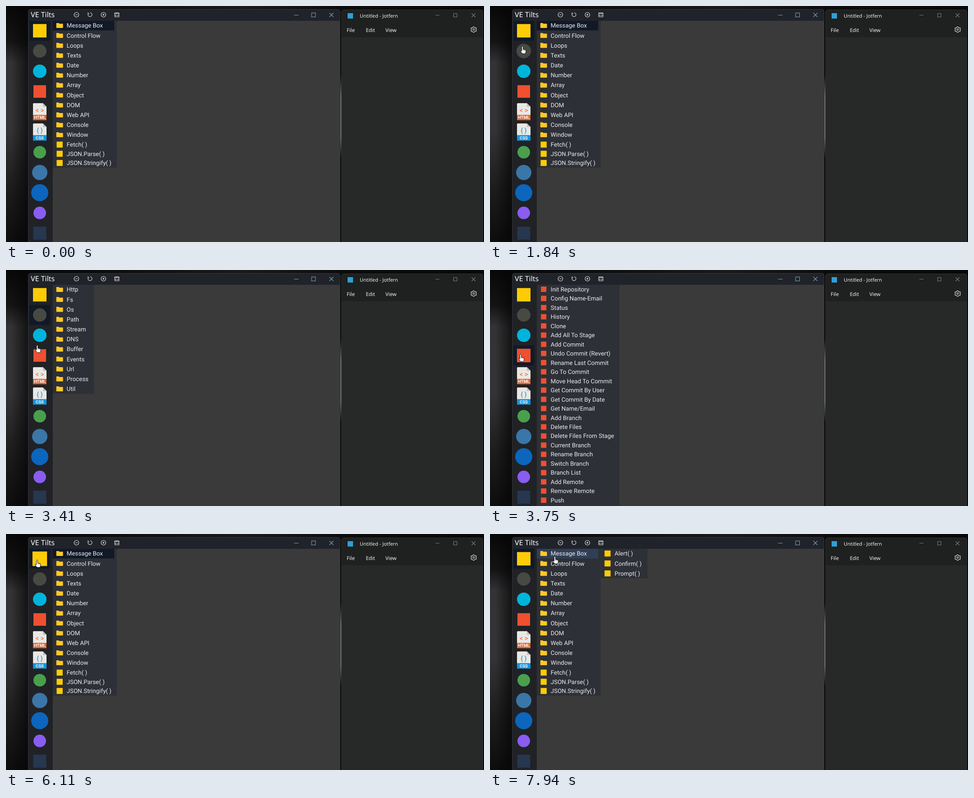
Write an HTML page that moves like this. It is 1062x527 px and loops after 8 s.

```html
<!DOCTYPE html>
<html lang="en">
<head>
<meta charset="utf-8">
<style>
html, body { margin: 0; width: 100%; height: 100%; overflow: hidden; background: #050506; }
svg { display: block; width: 1062px; height: 527px; }
text { fill: #ececee; font: 13.4px Roboto, sans-serif; white-space: pre; text-rendering: geometricPrecision; }
.ui { font-family: "Open Sans", sans-serif; fill: #fff; }
.bar { font-size: 11.4px; }
.line { fill: none; stroke: #e8e8e8; stroke-width: 1.1; }
</style>
</head>
<body>
<svg viewBox="0 0 1062 527">
  <defs>
    <linearGradient id="wall" x2="0" y2="1">
      <stop offset="0" stop-color="#080808"/><stop offset=".15" stop-color="#141415"/>
      <stop offset=".24" stop-color="#333335"/><stop offset=".52" stop-color="#343436"/>
      <stop offset=".75" stop-color="#1e1e1f"/><stop offset="1" stop-color="#0d0d0e"/>
    </linearGradient>
    <linearGradient id="shade">
      <stop offset=".25" stop-color="#050506" stop-opacity="0"/><stop offset="1" stop-color="#050506" stop-opacity=".7"/>
    </linearGradient>
    <linearGradient id="top">
      <stop offset=".05" stop-color="#070708"/><stop offset=".5" stop-color="#1a1a1c"/>
      <stop offset=".7" stop-color="#0d0d0e"/><stop offset="1" stop-color="#080808"/>
    </linearGradient>
    <linearGradient id="glint" x2="0" y2="1">
      <stop offset="0" stop-color="#777" stop-opacity="0"/><stop offset=".25" stop-color="#757575"/>
      <stop offset=".75" stop-color="#757575"/><stop offset="1" stop-color="#777" stop-opacity="0"/>
    </linearGradient>
    <path id="folder" d="M-7.4-4.6q0-1 1-1h4.2l1.6 1.5H6.4q1 0 1 1V4.5q0 1-1 1H-6.4q-1 0-1-1z" fill="#ffc928"/>
    <rect id="script" x="-6.7" y="-6.7" width="13.4" height="13.4" fill="#fdcc07"/>
    <rect id="branch" x="-6" y="-6" width="12" height="12" fill="#ee5030"/>
  </defs>

  <!-- desktop -->
  <rect width="1062" height="527" fill="#050506"/>
  <rect width="1062" height="8" fill="url(#top)"/>
  <rect width="49" height="527" fill="url(#wall)"/>
  <rect width="49" height="527" fill="url(#shade)"/>
  <rect x="742" y="155" width="3" height="185" fill="url(#glint)"/>

  <!-- tool window -->
  <path d="M49 527V13q0-6 6-6H737q6 0 6 6V527z" fill="#202329"/>
  <rect x="49" y="33" width="55" height="494" fill="#202226"/>
  <path d="M49.5 527V13q0-5.5 5.5-5.5H737q5.5 0 5.5 5.5V33" fill="none" stroke="#33363c"/>
  <rect x="104" y="33" width="638.5" height="494" fill="#3a3a3a"/>
  <text x="55" y="25" class="ui" style="font-size:16px;font-family:'Noto Sans',sans-serif">VE Tilts</text>
  <g class="line">
    <circle cx="156.5" cy="19.5" r="5.2"/><path d="M154 19.5h5"/>
    <path d="M183 16.5a4.5 4.5 0 1 0 4-1.7M182.3 14.3v3h3"/>
    <circle cx="216.5" cy="19.5" r="5.2"/><path d="M214 19.5h5M216.5 17v5"/>
    <rect x="241.5" y="15.2" width="9.6" height="9" rx="1"/>
    <path d="M241.5 16.5h9.6M245 19l-1.5 1.7 1.5 1.7M247.6 19l1.5 1.7-1.5 1.7"/>
    <g stroke="#6fa9ba"><path d="M640 20.5h10M718.5 15.5l9 9m0-9l-9 9"/><rect x="679" y="15.5" width="8.6" height="9"/></g>
  </g>

  <!-- editor window -->
  <path d="M745 527V14q0-6 6-6H1054q6 0 6 6V527z" fill="#272928"/>
  <path d="M745 69.5V14q0-6 6-6H1054q6 0 6 6V69.5z" fill="#1f2020"/>
  <path d="M745.5 527V14q0-5.5 5.5-5.5H1054q5.5 0 5.5 5.5V527" fill="none" stroke="#303131"/>
  <rect x="759" y="16" width="12" height="12" fill="#2d9fd8"/>
  <text x="786" y="26" class="ui" style="font-size:11px">Untitled - Jotfern</text>
  <text x="757" y="58" class="ui bar">File</text>
  <text x="799.5" y="58" class="ui bar">Edit</text>
  <text x="843" y="58" class="ui bar">View</text>
  <g class="line">
    <g stroke="#7c7d7d"><path d="M954 20.5h9M1034.5 16.5l8.5 8.5m0-8.5l-8.5 8.5"/><rect x="994.5" y="17" width="7.5" height="7.5"/></g>
    <path d="M1037.8 46.5h2.6l.5 1.6 1.5.8 1.6-.4 1.3 2.2-1.1 1.3v1.4l1.1 1.3-1.3 2.2-1.6-.4-1.5.8-.5 1.5h-2.6l-.5-1.5-1.5-.8-1.6.4-1.3-2.2 1.1-1.3v-1.4l-1.1-1.3 1.3-2.2 1.6.4 1.5-.8z"/>
    <circle cx="1039.1" cy="52.6" r="1.9"/>
  </g>

  <rect id="active" x="52" y="33" width="46.5" height="44.5" fill="#111927"/>
  <g id="icons"></g>
  <g id="menus"></g>
  <g id="cursor" stroke="#111" fill="#fff">
    <path id="arrow" d="M0 0V14l3.4-3 2.3 5.2 2-.9-2.3-5H10z"/>
    <g id="hand">
      <path d="M-1.5 1.5a1.5 1.5 0 0 1 3 0V6.5l4.6 1.1q1.9.5 1.7 2.4L7.2 14.5Q6.7 16.5 5.2 16.5H1Q-.4 16.5-1.4 14.8L-3.9 11.2q-.8-1.9 1-1.5L-1.5 10.6z"/>
      <path d="M1.5 6.5v3M3.7 7.2v2.5M5.8 7.7v2.3" fill="none" stroke-width=".6"/>
    </g>
  </g>
</svg>
<script>
const $ = id => document.getElementById(id);
const show = (el, on) => el.style.display = on ? '' : 'none';
const rect = (x, y, w, h, fill, more = '') =>
  `<rect x="${x}" y="${y}" width="${w}" height="${h}" fill="${fill}" ${more}/>`;
const square = (size, fill) => rect(-size / 2, -size / 2, size, size, fill);
const disc = (r, fill) => `<circle r="${r}" fill="${fill}"/>`;
const page = (name, sign, color) =>
  `<path d="M-15-17q0-2 2-2H7l8 8V19H-15z" fill="#e9e8e4"/><path d="M7-19l8 8H7z" fill="#c2c4c2"/>
   ${rect(-15, 7, 30, 12, color)}
   <text y="1.5" text-anchor="middle" style="font-size:15px;fill:${color}">${sign}</text>
   <text y="16.3" text-anchor="middle" style="font-size:9.5px;font-weight:700;fill:#fff">${name}</text>`;

// Sidebar
const icons = [
  square(30, '#fdcc07'), disc(15, '#464a43'), disc(15, '#00b4dc'), square(28, '#ee5030'),
  page('HTML', '&lt; &gt;', '#e8642c'), page('CSS', '{ }', '#1296e0'),
  disc(14, '#48a04c'), disc(17, '#3a76a8'), disc(19, '#0c66bd'), disc(14, '#8a5cf0'), square(29, '#26374f')
];
const iconY = i => 55.3 + 45.2 * i;
$('icons').innerHTML = icons.map(s => `<g>${s}</g>`).join('');
const iconEls = [...$('icons').children];

// Menus
const row = (icon, label, x, y) =>
  `<use href="#${icon}" x="${x + 15.2}" y="${y}"/><text x="${x + 30.8}" y="${Math.round(y + 4.8)}">${label}</text>`;
const rows = (icon, labels, x, y, step) =>
  labels.split(',').map((s, i) => row(icon, s, x, y + step * i)).join('');
const panel = (x, w, h, body) => `<g>${rect(x, 33, w, h, '#2e3037')}${body}</g>`;

$('menus').innerHTML =
  panel(104, 142, 328, rect(104, 33, 136.5, 21.5, '#111927', 'id="first"') +
    rows('folder', 'Message Box,Control Flow,Loops,Texts,Date,Number,Array,Object,DOM,Web API,Console,Window', 104, 43.6, 22.18) +
    rows('script', 'Fetch( ),JSON.Parse( ),JSON.Stringify( )', 104, 309.5, 20.5)) +
  panel(104, 91.5, 243.5,
    rows('folder', 'Http,Fs,Os,Path,Stream,DNS,Buffer,Events,Url,Process,Util', 104, 43.6, 22.18)) +
  panel(104, 184, 494,
    rows('branch', 'Init Repository,Config Name-Email,Status,History,Clone,Add All To Stage,Add Commit,' +
      'Undo Commit (Revert),Rename Last Commit,Go To Commit,Move Head To Commit,Get Commit By User,' +
      'Get Commit By Date,Get Name/Email,Add Branch,Delete Files,Delete Files From Stage,Current Branch,' +
      'Rename Branch,Switch Branch,Branch List,Add Remote,Remove Remote,Push,Pull', 104, 43, 20.48)) +
  panel(246.5, 103.5, 66, rows('script', 'Alert( ),Confirm( ),Prompt( )', 246, 43.6, 22.18));
const [mainMenu, nodeMenu, gitMenu, subMenu] = $('menus').children;

// Pointer path: time, x, y
const path = [
  [240, 338, 495], [600, 72, 56], [773, 73, 84], [990, 68, 80],
  [1060, 66, 76], [1400, 58, 54], [1840, 72, 90], [1910, 72, 92], [2180, 71, 100],
  [2780, 71, 100], [2840, 71, 98], [3600, 69, 187], [3700, 68, 188],
  [5140, 68, 188], [5200, 68, 184], [5960, 69, 58],
  [6370, 69, 58], [6930, 142, 52], [7730, 142, 52], [7900, 144, 50], [8000, 144, 50]
];

function pointAt(t) {
  const i = Math.max(1, path.findIndex(p => p[0] >= t));
  const [t0, x0, y0] = path[i - 1], [t1, x1, y1] = path[i];
  const k = Math.max(0, (t - t0) / (t1 - t0)), e = k * k * (3 - 2 * k);
  return [x0 + (x1 - x0) * e, y0 + (y1 - y0) * e];
}

const STEP = 200 / 3;

function draw() {
  const t = performance.now() % 8000;
  const visible = t >= 236;
  const [x, y] = pointAt(240 + Math.floor((t - 236) / STEP) * STEP);
  const tab = t < 2050 || t >= 6105 ? 0 : t < 3740 ? 1 : 3;

  show(mainMenu, tab === 0);
  show(nodeMenu, tab === 1);
  show(gitMenu, tab === 3);
  show(subMenu, t >= 7868);
  $('active').setAttribute('y', 33 + 45.2 * tab);
  $('first').setAttribute('fill', visible && x > 104 && x < 241 && y < 55 ? '#303f56' : '#111927');

  iconEls.forEach((el, i) => {
    const hot = visible && Math.abs(x - 75) < 20 && Math.abs(y - iconY(i)) < 15.5;
    el.setAttribute('transform', `translate(75 ${iconY(i)}) scale(${hot ? 1.08 : 1})`);
  });

  const overLink = x < 104 || (x < 246 && y < 361);
  show($('cursor'), visible);
  show($('hand'), overLink);
  show($('arrow'), !overLink);
  $('cursor').setAttribute('transform', `translate(${x} ${y})`);
  requestAnimationFrame(draw);
}
draw();
</script>
</body>
</html>
```
